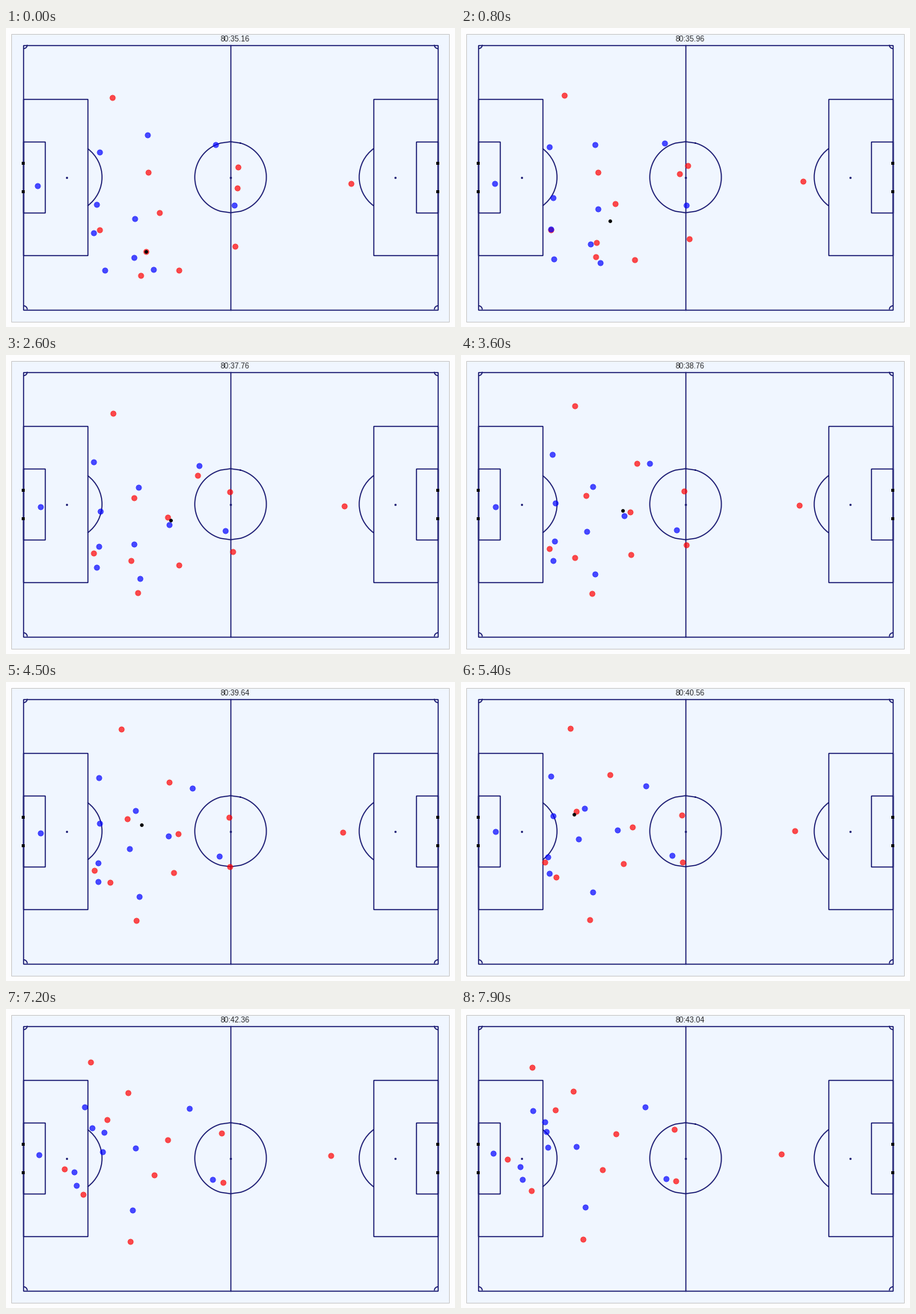
Animation, 600 px wide and 400 px high, one loop 8000 ms. Source, as a matplotlib script:

```python
import matplotlib.pyplot as plt
import numpy as np
from matplotlib.animation import FuncAnimation
from matplotlib.patches import Arc, Rectangle

W, H, DPI = 600, 400, 100
FRAMES, INTERVAL = 80, 100
PX = 72 / DPI  # one pixel in points
LINE, LINE_W = "#10106c", 1.4 * PX

# The more turns in a run, the more waypoints: seconds by number of points
TIMES = {3: (0, 4.48, 7.88), 4: (0, 1.48, 4.48, 7.88), 5: (0, 1.48, 2.6, 4.48, 7.88)}

RED = [
    [(309, 213.5), (217.5, 134), (150, 110)],
    [(306, 291.5), (299, 247), (287, 230)],
    [(230.5, 323.5), (223.5, 254.5), (188.5, 214.5)],
    [(142, 92.5), (136.5, 87.5), (153.5, 62.5), (95, 78)],
    [(190, 193), (177, 192), (161.5, 182.5), (126, 135)],
    [(125, 269.5), (117.5, 268.5), (117.5, 251.5), (61.5, 201)],
    [(180, 330.5), (177.5, 289.5), (139, 267.5), (93.5, 243)],
    [(205, 246.5), (208, 227), (230, 202.5), (207, 167)],
    [(310, 185.5), (299.5, 183.5), (297.5, 181), (285, 160.5)],
    [(460.5, 207.5), (454, 203.5), (450, 200.5), (427.5, 194)],
    [(186.5, 299), (177.5, 288.5), (176, 318), (174, 319), (163, 307.5)],
]
BLUE = [
    [(280, 156), (249, 142), (246, 130.5)],
    [(305, 237), (285, 233), (274, 226.5)],
    [(121, 235.5), (125, 189), (111.5, 151)],
    [(117, 274), (122.5, 241.5), (78.5, 211)],
    [(170.5, 306.5), (164.5, 222.5), (115.5, 185)],
    [(42, 211), (46, 205.5), (46, 201.5), (43, 192.5)],
    [(124.5, 165.5), (115, 154), (123.5, 127.5), (96, 135.5)],
    [(132, 323.5), (121, 297.5), (122.5, 266.5), (81.5, 228)],
    [(196.5, 323), (181, 307.5), (178, 287), (166, 264.5)],
    [(188.5, 142.5), (175.5, 165), (176.5, 176.5), (173, 171.5), (113.5, 163.5)],
    [(171.5, 254.5), (194.5, 234.5), (218, 226.5), (216.5, 205.5), (153.5, 183.5)],
]
# Second, x, y of every touch; the last one is the goal
BALL = np.array([
    (0, 186.5, 299), (1.4, 208, 227), (2.6, 219.5, 221), (3.4, 224, 212),
    (4.48, 181, 190.5), (5.4, 151.2, 176.5), (5.9, 143, 171), (7, 21.5, 185),
])


class Run:
    """Smooth path through waypoints, without wide overshoot."""

    def __init__(self, points):
        self.pos = np.array(points, float)
        self.time = np.array(TIMES[len(points)])
        slope = np.diff(self.pos, axis=0) / np.diff(self.time)[:, None]
        before, after = np.vstack([slope[:1], slope]), np.vstack([slope, slope[-1:]])
        limit = 3 * np.minimum(abs(before), abs(after))
        self.vel = np.clip(np.gradient(self.pos, self.time, axis=0, edge_order=2),
                           -limit, limit)

    def at(self, t):
        i = min(np.searchsorted(self.time, t, "right") - 1, len(self.time) - 2)
        h = self.time[i + 1] - self.time[i]
        u = (t - self.time[i]) / h
        return ((1 + 2 * u) * (1 - u) ** 2 * self.pos[i]
                + u * (1 - u) ** 2 * h * self.vel[i]
                + u * u * (3 - 2 * u) * self.pos[i + 1]
                + u * u * (u - 1) * h * self.vel[i + 1])


def box(x, y, w, h, color=LINE, lw=LINE_W, fill="none"):
    ax.add_patch(Rectangle((x, y), w, h, fc=fill, ec=color, lw=lw))


def arc(x, y, r, start, end):
    ax.add_patch(Arc((x, y), 2 * r, 2 * r, theta1=start, theta2=end, ec=LINE, lw=LINE_W))


def dots(color, size, x=(), y=(), marker="o", **kw):
    return ax.plot(x, y, marker, color=color, ms=size * PX, **{"mew": 0, **kw})[0]


def draw_pitch():
    left, right, top, bottom = 23.4, 577.4, 22.6, 376.6
    mx, my = (left + right) / 2, (top + bottom) / 2
    box(7.4, 8, 585, 384.5, "#cccccc", PX, "#f0f6ff")
    box(left, top, right - left, bottom - top)
    ax.plot([mx, mx], [top, bottom], color=LINE, lw=LINE_W)
    for w, h in ((86, 209), (29, 95)):
        box(left, my - h / 2, w, h)
        box(right - w, my - h / 2, w, h)
    # The circle is slightly flat at top and bottom
    a = np.radians(np.r_[np.linspace(-74, 74, 60), 90, np.linspace(106, 254, 60), 270, 286])
    ax.plot(mx - 0.3 + 47.8 * np.cos(a), my + 47.5 * np.sin(a), color=LINE, lw=LINE_W)
    spots = left + 57.3, right - 57.8
    arc(spots[0], my, 47.6, -53.5, 53.5)
    arc(spots[1], my, 47.6, 126.5, 233.5)
    corners = (left, top), (right, top), (right, bottom), (left, bottom)
    for i, (x, y) in enumerate(corners):
        arc(x, y, 5, 90 * i, 90 * i + 90)
    dots(LINE, 2.8, [spots[0], mx - 0.3, spots[1]], [my] * 3)
    dots("black", 5, [left, left, right, right], [my - 19, my + 19] * 2, "s")


fig = plt.figure(figsize=(W / DPI, H / DPI), dpi=DPI, facecolor="#fdfdfe")
ax = fig.add_axes([0, 0, 1, 1])
ax.set(xlim=(0, W), ylim=(H, 0))
ax.axis("off")
draw_pitch()

teams = [([Run(p) for p in team], dots(color, 7.2, mew=0.7 * PX, alpha=0.7))
         for team, color in ((RED, "red"), (BLUE, "blue"))]
ball = dots("black", 4.8)
clock = ax.text(306.1, 18, "", ha="center", va="baseline", color="#262626",
                fontfamily="Liberation Sans", fontsize=7.2)


def update(i):
    t = int(i * 2.5) * 0.04  # tracking data runs at 25 per second
    for runs, marks in teams:
        marks.set_data(*np.transpose([run.at(t) for run in runs]))
    sec, x, y = BALL.T
    ball.set_data([np.interp(t, sec, x)], [np.interp(t, sec, y)])
    ball.set_visible(t < sec[-1] + 0.02)
    clock.set_text(f"80:{35.16 + t:05.2f}")
    return [marks for _, marks in teams] + [ball, clock]


anim = FuncAnimation(fig, update, frames=FRAMES, interval=INTERVAL,
                     repeat=True, repeat_delay=0)
plt.show()
```
